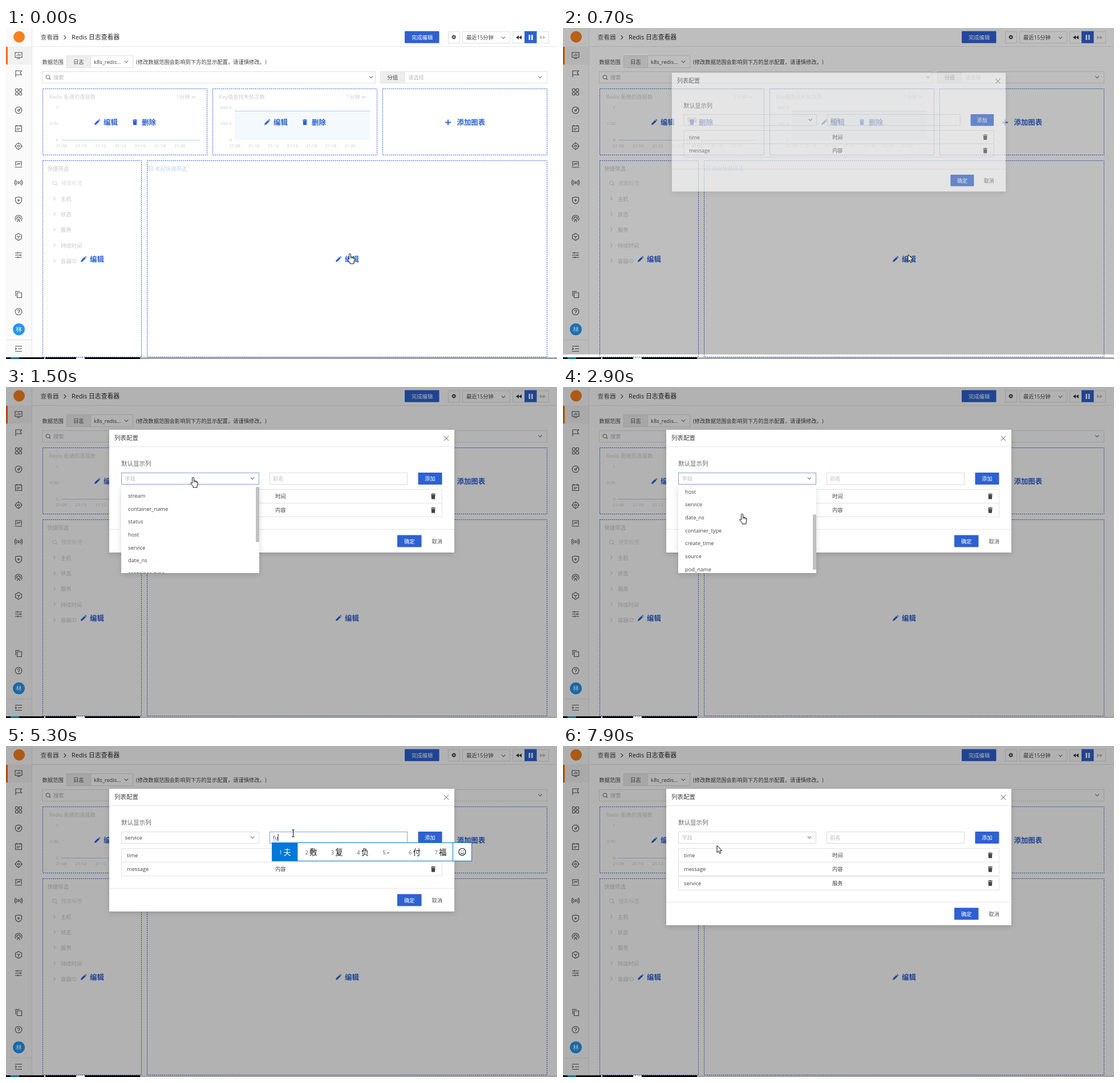
An HTML page for the animation above (8000 ms loop, 966 px wide and 580 px high).

```html
<!DOCTYPE html>
<html lang="zh">
<head>
<meta charset="utf-8">
<style>
html, body { margin: 0; width: 100%; height: 100%; overflow: hidden; background: #fff; }
svg { display: block; width: 966px; height: 580px; font-family: "Open Sans", "Noto Sans CJK SC", "Noto Sans CJK", sans-serif; }
text { white-space: pre; text-spacing-trim: space-all; }
</style>
</head>
<body>
<svg viewBox="0 0 966 580">
  <defs>
    <clipPath id="listClip"><rect x="202" y="175" width="242" height="151"/></clipPath>
    <filter id="shadow" x="-10%" y="-15%" width="120%" height="135%">
      <feDropShadow dx="0" dy="3" stdDeviation="5" flood-opacity=".15"/>
    </filter>
  </defs>
  <g id="page"></g>
  <rect id="shade" width="966" height="577"/>
  <g id="modal"></g>
  <g id="popup"></g>
  <g id="cursor"></g>
</svg>
<script>
const LOOP = 8000;
const BLUE = '#2d61d2';
const $ = id => document.getElementById(id);

// Drawing helpers: text is placed by its left edge and vertical middle.
const text = (x, y, s, fill = '#444', size = 9.3, more = '') =>
  `<text x="${x}" y="${y + size * .37}" font-size="${size}" fill="${fill}" ${more}>${s}</text>`;
const rect = (x, y, w, h, fill = 'none', stroke = 'none', more = '') =>
  `<rect x="${x}" y="${y}" width="${w}" height="${h}" fill="${fill}" stroke="${stroke}" ${more}/>`;
const box = (x, y, w, h, stroke = '#e0e0e0', fill = '#fff', more = '') =>
  rect(x + .5, y + .5, w - 1, h - 1, fill, stroke, more);
const line = (x, y, w, h, fill = '#e6e6e6') => rect(x, y, w, h, fill);
const solid = (x, y, d, fill) => `<path transform="translate(${x} ${y})" d="${d}" fill="${fill}"/>`;
const stroke = (x, y, d, color = '#555', width = 1.1, more = '') =>
  `<path transform="translate(${x} ${y})" d="${d}" fill="none" stroke="${color}" stroke-width="${width}" ${more}/>`;
const ring = (x, y, r) => `M${x - r} ${y}a${r} ${r} 0 1 0 ${2 * r} 0a${r} ${r} 0 1 0 ${-2 * r} 0`;
const down = (x, y, color = '#777') => stroke(x, y, 'M-3.2 -1.6L0 1.6L3.2 -1.6', color);
const lens = (x, y, color) => stroke(x, y, ring(-.5, -.5, 3.3) + 'M2 2L4 4', color);
const pencil = (x, y) => solid(x, y,
  'M-5 5L-4.3 2L1.5 -3.8L3.9 -1.4L-2 4.3ZM2.3 -4.5L3.3 -5.5L5.5 -3.3L4.6 -2.3Z', BLUE);
const trash = (x, y, color = '#444') => solid(x, y,
  'M-4 -4.2H-1.5V-5H1.5V-4.2H4V-3H-4ZM-3.4 -2.4H3.4L3 5H-3Z', color);
const action = (x, y, s) => text(x, y, s, BLUE, 12.4, 'font-weight="700"');
const edit = (x, y) => pencil(x, y) + action(x + 11, y, '编辑');
const dashed = (x, y, w, h) => box(x, y, w, h, BLUE, 'none', 'stroke-dasharray="2 1.5"');

const sideIcons = [
  [48, 'M-6 -5H6V3.5H-6ZM-2.5 1V-1M0 1V-3M2.5 1V-2M-3 5.5H3'],
  [80, 'M-5 6V-5H5.5L3 -1.5L5.5 2H-5'],
  [112, ring(-3.2, -3.2, 2.5) + ring(3.2, -3.2, 2.5) + ring(-3.2, 3.2, 2.5) + ring(3.2, 3.2, 2.5)],
  [144, ring(0, 0, 5.8) + ring(0, .5, 1.5) + 'M1 -.5L3.5 -3'],
  [176, 'M-5.5 -4.5H5.5V5.5H-5.5ZM-3 -6.3V-3M3 -6.3V-3M-3.5 0H3.5M-3.5 2.5H1'],
  [207, ring(0, 0, 5) + ring(0, 0, 1.8) + 'M0 -7V-4M0 7V4M-7 0H-4M7 0H4'],
  [239, 'M-5 3V-5H5V3M-6.5 5H6.5M-3 1L-1 -2L1 0L3 -3'],
  [271, ring(0, 0, 1.6) + 'M-2.8 -3.3A4.2 4.2 0 0 0 -2.8 3.3M2.8 -3.3A4.2 4.2 0 0 1 2.8 3.3M-4.7 -5A7 7 0 0 0 -4.7 5M4.7 -5A7 7 0 0 1 4.7 5'],
  [302, 'M0 -6L5.5 -4.5V0Q5.5 4 0 6.2Q-5.5 4 -5.5 0V-4.5ZM0 -2.5V2.5M-2.5 0H2.5'],
  [334, 'M-4.5 4A6 6 0 1 1 4.5 4M-2.4 1.8A3 3 0 1 1 2.4 1.8M-2.5 6L0 1L2.5 6'],
  [366, 'M0 -6L5.5 -3V3L0 6L-5.5 3V-3ZM-3 -1.5L0 0L3 -1.5M0 0V3.5'],
  [398, 'M-6 -4H6M-6 0H6M-6 4H6M-2 -5.5V-2.5M3 -1.5V1.5M-1 2.5V5.5'],
  [467, 'M-5 3V-5.5H2M-2.5 -3H5.5V5.5H-2.5Z'],
  [497, ring(0, 0, 5.8) + 'M-1.8 -1.2A1.9 1.9 0 1 1 0 .8V1.8M0 2.6V3.6'],
  [562, 'M-6 -4.5H6M-1 0H6M-6 4.5H6M-6 -2L-3.5 0L-6 2']
];

function chart(x, title, labels, step, x0, labelEnd) {
  const gray = '#cbcbcb';
  const ticks = labels.map((s, i) => text(labelEnd, 139 + i * 28.5, s, gray, 7.7, 'text-anchor="end"'));
  const times = [8, 10, 12, 14, 16, 18, 20].map((m, i) =>
    text(x0 + i * step, 206, '21:' + String(m).padStart(2, '0'), gray, 7.7, 'text-anchor="middle"'));
  return dashed(x, 106, 289, 117) + text(x + 11.5, 121, title, '#cfcfcf') +
    text(x + 235, 121, '1分钟', '#cfcfcf') + down(x + 265, 121, '#ccc') + ticks.join('') + times.join('') +
    edit(x + 96, 165) + trash(x + 162, 165, BLUE) + action(x + 174, 165, '删除');
}

function drawPage() {
  const filters = ['主机', '状态', '服务', '持续时间', '容器ID'];
  return rect(0, 0, 966, 580, '#fff') +
    // sidebar
    rect(0, 0, 45, 577, '#fafafa') + line(45, 0, 1, 577) + rect(0, 32, 45, 32, '#f1f1f1') +
    rect(0, 33, 3, 31, '#ff6a00') + '<circle cx="23" cy="15.5" r="10" fill="#f9801d"/>' +
    sideIcons.map(([y, d]) => stroke(22, y, d)).join('') +
    '<circle cx="22.5" cy="528" r="10.5" fill="#2196f3"/>' + text(17.2, 528, '林', '#fff', 10.5) +
    line(0, 546, 45, 1) +
    // header
    line(46, 32, 920, 1) + text(60.5, 16.5, '查看器', '#555', 10.7) +
    stroke(103.5, 16.5, 'M-2 -3.5L1.5 0L-2 3.5', '#555') + text(115, 16.5, 'Redis 日志查看器', '#222', 10.8) +
    rect(699, 5.5, 60.5, 21, BLUE, 'none', 'rx="1"') + text(711, 16.5, '完成编辑', '#fff') +
    box(775, 6, 21, 21) + stroke(785.2, 16, ring(0, 0, 2.1), '#444', 1.7) +
    stroke(785.2, 16, ring(0, 0, 3.3), '#444', 1.2, 'stroke-dasharray="1.4 1.19"') +
    box(800, 6, 84, 21) + text(807, 16.5, '最近15分钟') + down(872, 17) +
    box(888, 6, 64, 21) + rect(909, 5.5, 21.5, 21, BLUE) +
    solid(899, 16.5, 'M0 -3.5V3.5L-5 0ZM5 -3.5V3.5L0 0Z', '#333') +
    solid(920, 16.5, 'M-3.5 -4.5H-1V4.5H-3.5ZM1 -4.5H3.5V4.5H1Z', '#fff') +
    solid(941, 16.5, 'M0 -3.5V3.5L5 0ZM-5 -3.5V3.5L0 0Z', '#c6c6c6') +
    // data range and search
    text(63.5, 59.5, '数据范围') + box(106, 48, 117, 22) + rect(106.5, 48.5, 42, 21, '#eeeeee', '#e0e0e0') +
    text(118, 59.5, '日志') + text(154, 59.5, 'k8s_redis...') + down(211, 59) +
    text(228, 59.5, '(修改数据范围会影响到下方的显示配置，请谨慎修改。)') +
    box(63, 76, 585, 21) + lens(74, 86.5, '#777') + text(83, 86.5, '搜索', '#b5b5b5') + down(640, 86) +
    box(656, 76, 293, 21) + rect(656.5, 76.5, 42, 20, '#eeeeee', '#e0e0e0') + text(668.5, 86.5, '分组') +
    text(705, 86.5, '请选择', '#bdbdbd') + down(936.5, 86) +
    // charts
    line(97, 196, 243, 1, '#b5d1f0') + rect(401, 146, 237, 50, '#f4f9fd') + line(401, 145, 237, 1, '#a3d2ee') +
    chart(64, 'Redis 拒绝的连接数', ['1', '0.50', '0'], 34.6, 97, 92) +
    chart(362, 'Key值查找失败次数', ['600 K', '300 K', '0'], 33.7, 401, 396) +
    dashed(660, 106, 289, 117) + stroke(775, 165.5, 'M-5 0H5M0 -5V5', BLUE, 1.8) + action(790.5, 165, '添加图表') +
    // lower panels
    dashed(64, 232, 174, 345) + text(72.5, 246.5, '快捷筛选', '#c8c8c8') +
    lens(85.5, 272, '#d8d8d8') + text(97, 271.5, '搜索标签', '#dddddd') +
    filters.map((s, i) => stroke(85, 299 + i * 27.2, 'M-1.5 -3L1.5 0L-1.5 3', '#d4d4d4') +
      text(96, 299.5 + i * 27.2, s, '#c8c8c8')).join('') + edit(136, 405) +
    dashed(247, 232, 702, 345) + stroke(253, 246, 'M-4 -4H4V4H-4ZM-1.5 -4V4M3 -1.5L1 0L3 1.5', '#c8d4ea', .9) +
    text(261, 246.5, '收起快捷筛选', '#c5d3ee') + edit(583, 405) +
    // taskbar edge
    line(0, 577, 966, 3, '#a4a4a4') + rect(0, 577, 235, 3, '#050505') + rect(8, 577, 15, 3, '#0a7896') +
    rect(67, 577, 2, 3, '#ddd') + rect(123, 577, 15, 3, '#e8e8e8');
}

const clamp = v => Math.max(0, Math.min(1, v));

// Caret visibility, given as [from, to].
const caretOn = [[4200, 4600], [5100, 6300], [6800, 7300]];
const within = (t, spans) => spans.some(([a, b]) => t >= a && t < b);

function aliasAt(t) {
  if (t < 5100 || t >= 7400) return '';
  if (t < 5200) return 'f';
  if (t < 5500) return 'fu';
  if (t < 5600) return 'fuw';
  return t < 5800 ? 'fuwu' : '服务';
}
const caretX = { '': 468, f: 471.5, fu: 477, fuw: 484.5, fuwu: 490, '服务': 487 };

function drawModal(t) {
  const added = t >= 7400, extra = added ? 24 : 0;
  const focus = '#8aa3cf', idle = '#dcdcdc';
  const field = t >= 3500 && !added ? 'service' : '';
  const alias = aliasAt(t);
  const rows = [['time', '时间'], ['message', '内容']];
  if (added) rows.push(['service', '服务']);
  const hover = t >= 7000 && t < 7500;
  return rect(181, 75, 605, 215 + extra, '#fff', 'none', 'filter="url(#shadow)"') +
    text(190, 89, '列表配置', '#444', 10.5) + stroke(772, 90, 'M-4.2 -4.2L4.2 4.2M4.2 -4.2L-4.2 4.2', '#888') +
    line(181, 104, 605, 1) + text(202, 134.5, '默认显示列', '#666', 10.5) +
    box(202, 150, 242, 21, t >= 1500 && t < 4200 ? focus : idle) +
    text(208.5, 160.5, field || '字段', field ? '#444' : '#bbb') + down(432, 160) +
    box(462, 150, 242, 21, t >= 3800 && !added ? focus : idle) +
    text(468, 160.5, alias || '别名', alias ? '#444' : '#bbb') +
    (t >= 5100 && t < 5800 ? stroke(468, 166.5, `M0 0H${caretX[alias] - 468}`, '#555', 1, 'stroke-dasharray="1 1"') : '') +
    (within(t, caretOn) ? line(caretX[alias] - .5, 154, 1, 12, '#222') : '') +
    rect(722.5, 150, 42, 21, hover ? '#2450c2' : BLUE, 'none', 'rx="1"') + text(734, 160.5, '添加', '#fff') +
    rows.map(([name, label], i) => {
      const y = 191.5 + i * 24.3;
      return box(202, Math.round(y - 12.5), 563, 25, '#e2e2e2') + text(212, y, name) +
        text(472, y, label) + trash(749, y, '#444');
    }).join('') +
    line(181, 249 + extra, 605, 1) + rect(686, 259.5 + extra, 42.5, 21, BLUE, 'none', 'rx="1"') +
    text(698, 270.5 + extra, '确定', '#fff') + text(746.5, 270.5 + extra, '取消', '#555');
}

const options = ['stream', 'container_name', 'status', 'host', 'service', 'date_ns',
  'container_type', 'create_time', 'source', 'pod_name'];

function drawList(t) {
  const scroll = 75.5 * clamp((t - 1900) / 400);
  return `<g opacity="${1 - clamp((t - 3400) / 300)}">` +
    rect(202, 174, 242, 152, '#fff', 'none', 'filter="url(#shadow)"') + '<g clip-path="url(#listClip)">' +
    options.map((s, i) => text(214, 190.5 + i * 22.7 - scroll, s)).join('') + '</g>' +
    rect(438, 175 + scroll * .64, 6, 97, '#c1c1c1', 'none', 'rx="2"') + '</g>';
}

const candidates = {
  f: '发 放 法 分 - 飞 方',
  fu: '夫 敷 复 负 - 付 福',
  fuw: '服务 氛围 符文 富翁 抚慰 腐物 赴外',
  fuwu: '服务 福屋 夫 复 负 付 福'
};

function drawIme(t) {
  const words = candidates[aliasAt(t)].split(' ');
  let x = 466, out = '';
  words.forEach((word, i) => {
    const w = 32.4 + 13 * word.length;
    if (!i) out += rect(x, 169, w, 33, '#0078d7');
    out += text(x + 13, 187, i + 1, i ? '#555' : '#fff', 9.3) + text(x + 20.5, 186, word, i ? '#111' : '#fff', 13.3);
    x += w;
  });
  const w = Math.round(x) + 33 - 466;
  return rect(466, 169, w, 33, '#fff') + out + box(466, 169, w, 33, '#0078d7', 'none') +
    line(Math.round(x) - 1, 169, 1, 33, '#0078d7') +
    stroke(x + 16, 185.5, ring(0, 0, 6) + 'M-3.2 1.5Q0 5 3.2 1.5M-2 -2.5V-1M2 -2.5V-1', '#111');
}

const track = [
  [0, 603, 395], [200, 603, 395], [300, 603, 396.5], [500, 605, 397], [700, 605, 397], [1000, 372, 210],
  [1300, 328, 158], [1500, 328, 158], [1900, 314, 222], [2900, 314, 222], [3100, 300, 203],
  [3500, 300, 203], [3900, 502, 154], [4200, 503.5, 153], [6400, 503.5, 153], [6600, 575, 113],
  [6700, 731, 88], [6800, 716, 113], [7000, 737, 166], [7400, 737, 166], [7900, 270, 174.5], [8000, 270, 174.5]
];

function pointAt(t) {
  const i = track.findIndex(k => k[0] > t);
  const [t0, x0, y0] = track[i - 1], [t1, x1, y1] = track[i];
  const p = (t - t0) / (t1 - t0), e = p * p * (3 - 2 * p);
  return [x0 + (x1 - x0) * e, y0 + (y1 - y0) * e];
}

function drawCursor(t) {
  const [x, y] = pointAt(t);
  const inside = (a, b, c, d) => x >= a && x <= c && y >= b && y <= d;
  const shape = d => `<path transform="translate(${x} ${y})" d="${d}" fill="#fff" stroke="#111" stroke-linejoin="round"/>`;
  if (t >= 900 && inside(462, 150, 704, 171))
    return stroke(x, y, 'M-2.5 -6H2.5M0 -6V6M-2.5 6H2.5', '#222');
  const hand = t < 500 || t >= 900 && (inside(202, 150, 444, 171) || inside(722, 150, 765, 171)) ||
    t >= 1500 && t < 3600 && inside(202, 171, 444, 326);
  if (hand)
    return shape('M-1.5 1.2Q0 -1 1.5 1.2V6L6.5 7.3Q8.4 8 8.2 10.5L7 15V18H0V16L-4.2 11Q-4.5 8.5 -1.5 10.5Z') +
      stroke(x, y, 'M1.5 6V9M4 7V9.5M6.4 7.6V10', '#111', .9);
  return shape('M0 0V12.2L2.8 9.6L4.8 14L6.8 13.1L4.9 8.8H8.7Z');
}

function render(time) {
  const t = Math.floor(time % LOOP / 100) * 100;
  const open = t < 500 ? 0 : clamp((t - 400) / 500);
  const scale = .9175 + .0825 * open;
  $('shade').setAttribute('opacity', open && .3 * Math.min(1, open + .25));
  $('shade').setAttribute('height', t < 800 ? 572 : 577);
  $('modal').setAttribute('opacity', open);
  $('modal').setAttribute('transform', `translate(483.5 182.5) scale(${scale}) translate(-483.5 -182.5)`);
  $('modal').innerHTML = open ? drawModal(t) : '';
  $('popup').innerHTML = t >= 1500 && t < 3700 ? drawList(t) : t >= 5100 && t < 5800 ? drawIme(t) : '';
  $('cursor').innerHTML = drawCursor(t);
}

$('page').innerHTML = drawPage();
const start = performance.now();
function tick() {
  render(performance.now() - start);
  requestAnimationFrame(tick);
}
tick();
</script>
</body>
</html>
```
